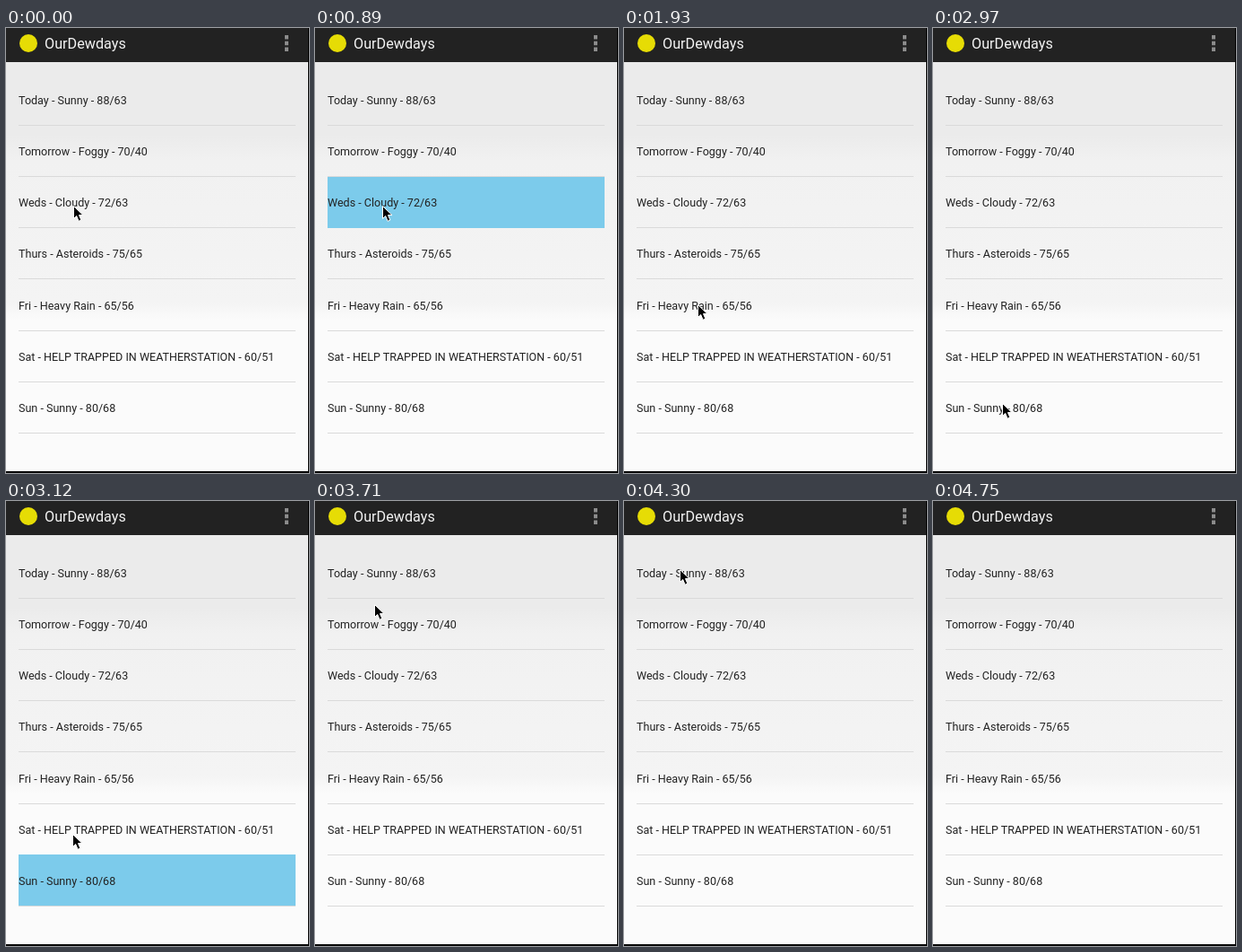
An HTML page that plays this animation: 338 by 496 pixels, repeating every 6.58 s.

```html
<!DOCTYPE html>
<html lang="en">
<head>
<meta charset="utf-8">
<title>Forecast list</title>
<style>
  html, body { margin: 0; width: 100%; height: 100%; overflow: hidden; background: #000; }
  svg { display: block; }
  text { font-family: Roboto, sans-serif; }
</style>
</head>
<body>
<svg width="338" height="496" viewBox="0 0 338 496">
  <defs>
    <linearGradient id="page" x2="0" y2="1">
      <stop offset=".24" stop-color="#ebebeb"/>
      <stop offset=".3" stop-color="#f1f1f1"/>
      <stop offset=".62" stop-color="#f4f4f4"/>
      <stop offset=".66" stop-color="#fbfbfb"/>
    </linearGradient>
  </defs>
  <rect width="337" height="494" fill="url(#page)"/>
  <rect width="337" height="38" fill="#222"/>
  <circle cx="25" cy="17" r="10" fill="#e6dc05"/>
  <text x="43" y="23" font-size="16.2" fill="#f3f3f3">OurDewdays</text>
  <path d="M313 8v18" stroke="#8c8c8c" stroke-width="4" stroke-dasharray="4.5 2.25"/>
  <g id="dividers" fill="#dadada"></g>
  <rect id="highlight" x="14" width="309" height="57" fill="#7ccbeb"/>
  <g id="labels" font-size="12.55" fill="#222"></g>
  <path id="cursor" d="M.5 .5V14.5L3.7 11.5L6.1 17.3L8.9 16.1L6.5 10.6H11Z" stroke="#fff"/>
</svg>
<script>
const LOOP = 6580, TICK = 148.4, ROW_HEIGHT = 57.15;
const rows = [
  'Today - Sunny - 88/63',
  'Tomorrow - Foggy - 70/40',
  'Weds - Cloudy - 72/63',
  'Thurs - Asteroids - 75/65',
  'Fri - Heavy Rain - 65/56',
  'Sat - HELP TRAPPED IN WEATHERSTATION - 60/51',
  'Sun - Sunny - 80/68'
];

// All ticks count screen refreshes; the pointer eases between key points.
const path = [
  { tick: 0, x: 75, y: 198 },
  { tick: 9, x: 75, y: 198 },
  { tick: 13, x: 82, y: 308 },
  { tick: 18, x: 79, y: 362 },
  { tick: 20, x: 77, y: 418 },
  { tick: 21, x: 74, y: 371 },
  { tick: 23, x: 68, y: 166 },
  { tick: 25, x: 66, y: 115 },
  { tick: 27, x: 66, y: 115 },
  { tick: 29, x: 62, y: 76 },
  { tick: 30, x: 62, y: 76 },
  { tick: 31, x: 265, y: 482 },
  { tick: 32, x: 338, y: 496 }
];
const pressedRow = { 6: 2, 21: 6, 27: 1, 30: 0 };

const $ = id => document.getElementById(id);
const easeOut = p => 1 - (1 - p) ** 2;
const mix = (a, b, p) => Math.round(a + (b - a) * p);

function add(parent, tag, attributes, content = '') {
  const node = document.createElementNS('http://www.w3.org/2000/svg', tag);
  for (const [name, value] of Object.entries(attributes)) node.setAttribute(name, value);
  node.textContent = content;
  parent.append(node);
}

rows.forEach((label, i) => {
  const offset = i * ROW_HEIGHT;
  add($('dividers'), 'rect', { x: 14, y: Math.round(108 + offset), width: 309, height: 1 });
  add($('labels'), 'text', { x: 14, y: Math.round(85 + offset) }, label);
});

function show(element, visible) {
  element.setAttribute('visibility', visible ? 'visible' : 'hidden');
}

function pointerAt(tick) {
  const next = path.findIndex(point => point.tick > tick);
  if (next < 0) return path.at(-1);
  const from = path[next - 1], to = path[next];
  const p = easeOut((tick - from.tick) / (to.tick - from.tick));
  return { x: mix(from.x, to.x, p), y: mix(from.y, to.y, p) };
}

function draw(now) {
  const tick = Math.floor((now % LOOP + 8) / TICK);
  const row = pressedRow[tick];
  show($('highlight'), row !== undefined);
  if (row !== undefined) $('highlight').setAttribute('y', Math.floor(52 + row * ROW_HEIGHT));

  const { x, y } = pointerAt(tick);
  $('cursor').setAttribute('transform', `translate(${x} ${y})`);
}

const begin = performance.now();
function animate() {
  draw(performance.now() - begin);
  requestAnimationFrame(animate);
}
animate();
</script>
</body>
</html>
```
